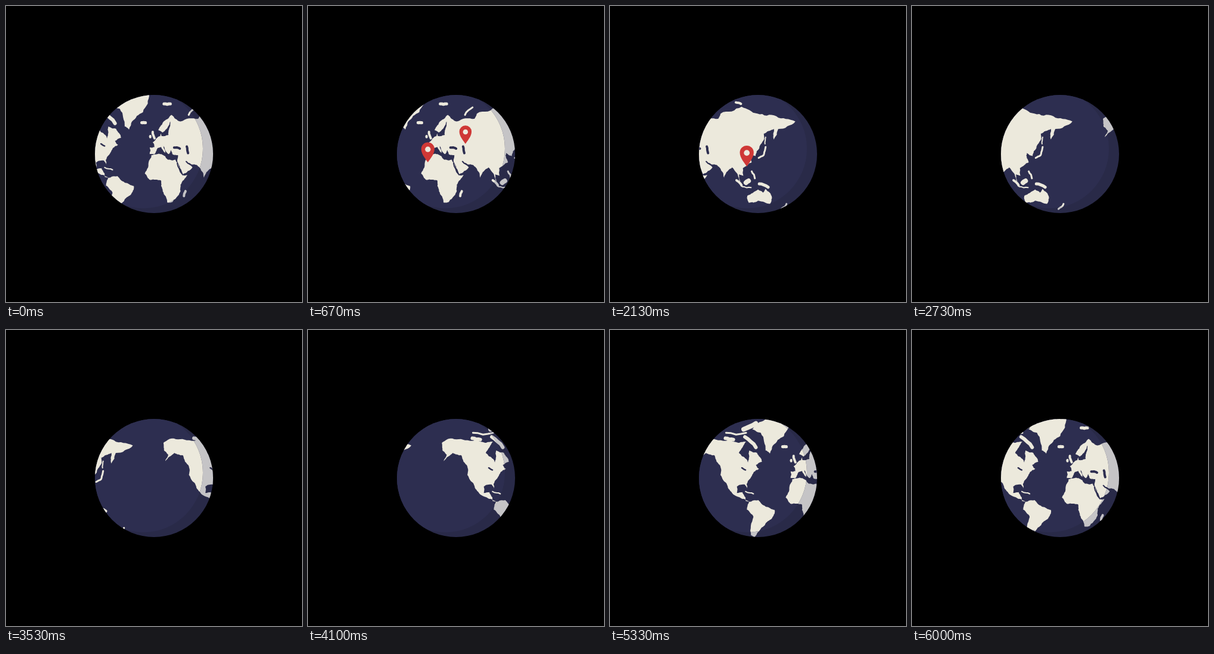
Write an HTML page with a canvas that moves like this. It is 496 px wide and 496 px high and loops after 6.03 s.

```html
<!DOCTYPE html>
<html lang="en">
<head>
<meta charset="utf-8">
<title>Turning globe</title>
<style>
html, body { margin: 0; width: 100%; height: 100%; overflow: hidden; background: #000; }
canvas { display: block; }
</style>
</head>
<body>
<canvas id="stage" width="496" height="496"></canvas>
<script>
const ctx = document.getElementById('stage').getContext('2d');
const LOOP = 6030, SPEED = 0.0672, SPAN = 422, MID = 248, RADIUS = 99;
const LIT = { land: '#ece9dc', sea: '#2d2e50' };
const DIM = { land: '#c5c4c6', sea: '#292a48' };
const PIN = '#cf3836';

// Key points of each coast as longitude, latitude pairs.
const eurasia = [-9,43.5, -9,37, -1,37, 4,43, 9,44, 16,38, 13,45, 22,37, 25,41, 28,36.5, 36,36, 35,29,
  44,13, 59,22, 49,29, 66,25, 72,20, 77.5,8, 81,16, 90,22, 98,14, 103,1, 101,13, 108,11, 107,21,
  121,28, 118,38, 127,35, 129,40, 141,52, 140,56, 156,60, 156,51, 163,60, 190,66, 160,70, 130,72,
  105,77, 72,72, 68,68, 40,66, 26,71, 12,65, 5,59, 12,57, 18,60, 24,66, 22,60, 21,55, 10,54,
  10,57, 8,54, -4,48.5, -1,44];
const africa = [-6,36, 10,37, 20,31, 32,31, 43,11.5, 51,12, 40,-4, 40,-15, 33,-27, 27,-34, 19,-34.5,
  12,-15, 9,4, -8,4.5, -17,14, -10,30];
const northAmerica = [-166,68, -156,71, -128,70, -95,68, -82,69, -94,60, -82,55, -79,52, -77,62,
  -64,60, -56,52.5, -66,49.5, -61,46, -70,42.5, -76,36, -81,31, -80,25.5, -84,30, -97,28, -97,20,
  -88,21, -83,14, -83,9.5, -77,8, -92,14, -105,20, -114,31, -124,40, -124,48, -134,58, -148,60,
  -163,53, -158,58.5, -165,62];
const southAmerica = [-77,8, -62,10.5, -50,0, -35,-6, -40,-21, -48,-27, -57,-37, -68,-53, -74,-50,
  -70,-18, -81,-5];
const greenland = [-72,78, -60,83, -35,86, -10,86, -20,73, -38,66, -43,59.5, -50,62, -58,75.5];
const australia = [114,-23, 131,-12, 139,-17.5, 142.5,-11, 153,-26, 150,-37, 131,-31.5, 116,-35];

// Long islands and narrow seas: both ends and a width.
const islands = [
  [-84,72.5, -66,64.5, 6], [-116,71.5, -103,70.5, 6], [-86,78, -66,82, 8], [-115,75.5, -82,75.5, 3],
  [53,71, 65,76.5, 3], [14,79, 24,79, 5], [96,80, 104,79, 4],
  [-22,65, -16,65, 5], [-1,52, -4,57.5, 4], [-8,53, -8,54, 4],
  [132,33, 140,36, 3], [140.5,37, 143,44, 3], [142,47, 143,53, 2],
  [97,4, 105,-5, 4], [106,-7, 120,-8.5, 2], [112,0, 116,3, 8], [121,17, 126,7, 3],
  [133,-2, 147,-8, 5], [176,-37, 168,-46, 3], [48,-15, 45.5,-23.5, 4], [-83,22, -70,19, 2]
];
const seas = [
  [30,43.5, 39,42.5, 4], [50,44.5, 52,38, 4], [35,27, 43,13, 2], [49,29, 55,26, 2], [-89,47, -83,45, 2.5]
];

let seed = 11;
function rand() {
  seed = (seed * 16807) % 2147483647;
  return seed / 2147483647 - 0.5;
}

const project = (lon, lat) => [
  250 + lon * (lon < 0 ? 1.02 : 1.06),
  296 - 0.96 * lat - (lat > 0 ? 0.009 * lat * lat : 0)
];

// Midpoint displacement turns a straight side into a ragged shore.
function shore(path, a, b, depth) {
  if (!depth) return path.lineTo(...b);
  const bend = rand() * 0.22, dx = b[0] - a[0], dy = b[1] - a[1];
  const m = [a[0] + dx / 2 - dy * bend, a[1] + dy / 2 + dx * bend];
  shore(path, a, m, depth - 1);
  shore(path, m, b, depth - 1);
}

function coast(list) {
  const pts = [];
  for (let i = 0; i < list.length; i += 2) pts.push(project(list[i], list[i + 1]));
  const path = new Path2D();
  path.moveTo(...pts[0]);
  pts.forEach((p, i) => shore(path, p, pts[(i + 1) % pts.length], 3));
  return path;
}

function strip([lon1, lat1, lon2, lat2, width]) {
  const a = project(lon1, lat1), path = new Path2D();
  path.moveTo(...a);
  shore(path, a, project(lon2, lat2), 2);
  return { path, width };
}

function disc(x, y, r) {
  const path = new Path2D();
  path.arc(x, y, r, 0, Math.PI * 2);
  return path;
}

const coasts = [eurasia, africa, northAmerica, southAmerica, greenland, australia].map(coast);
const isles = islands.map(strip), straits = seas.map(strip);
const globe = disc(MID, MID, RADIUS), light = disc(230, 239, 100);

function strokeAll(strips, color) {
  ctx.strokeStyle = color;
  for (const s of strips) {
    ctx.lineWidth = s.width;
    ctx.stroke(s.path);
  }
}

function paint(tone, shift) {
  ctx.fillStyle = tone.sea;
  ctx.fillRect(MID - 100, MID - 100, 200, 200);
  ctx.fillStyle = tone.land;
  ctx.lineCap = ctx.lineJoin = 'round';
  for (const copy of [0, SPAN]) {
    ctx.save();
    ctx.translate(copy - shift, 0);
    coasts.forEach(p => ctx.fill(p));
    strokeAll(isles, tone.land);
    strokeAll(straits, tone.sea);
    ctx.restore();
  }
}

// Tip position on the map, then the times of appearing and leaving.
const pins = [
  { x: 244, y: 262, from: 330, to: 1050 },
  { x: 307, y: 231, from: 540, to: 1350 },
  { x: 370, y: 269, from: 1150, to: 2250 },
  { x: 576, y: 257, from: 4200, to: 5300 }
];

const clamp = v => Math.max(0, Math.min(1, v));
const backOut = u => 1 + 2.7 * (u - 1) ** 3 + 1.7 * (u - 1) ** 2;

function drawPin(pin, t, shift) {
  const size = backOut(clamp((t - pin.from) / 400)) * backOut(clamp((pin.to - t) / 250));
  if (size <= 0) return;
  ctx.save();
  ctx.translate(pin.x - shift, pin.y);
  ctx.scale(size, size);
  ctx.fillStyle = PIN;
  ctx.beginPath();
  ctx.moveTo(0, 0);
  ctx.bezierCurveTo(-3, -5, -10.8, -13, -10.8, -21.7);
  ctx.arc(0, -21.7, 10.8, Math.PI, 0);
  ctx.bezierCurveTo(10.8, -13, 3, -5, 0, 0);
  ctx.fill();
  ctx.fillStyle = LIT.land;
  ctx.fill(disc(0, -21.2, 4.5));
  ctx.restore();
}

function draw(t) {
  const shift = t * SPEED - 3 * Math.sin(t / LOOP * Math.PI * 2);
  ctx.fillStyle = '#000';
  ctx.fillRect(0, 0, 496, 496);
  ctx.save();
  ctx.clip(globe);
  paint(DIM, shift);
  ctx.clip(light);
  paint(LIT, shift);
  ctx.restore();
  pins.forEach(pin => drawPin(pin, t, shift));
}

const start = performance.now();
function tick() {
  draw((performance.now() - start) % LOOP);
  requestAnimationFrame(tick);
}
tick();
</script>
</body>
</html>
```
